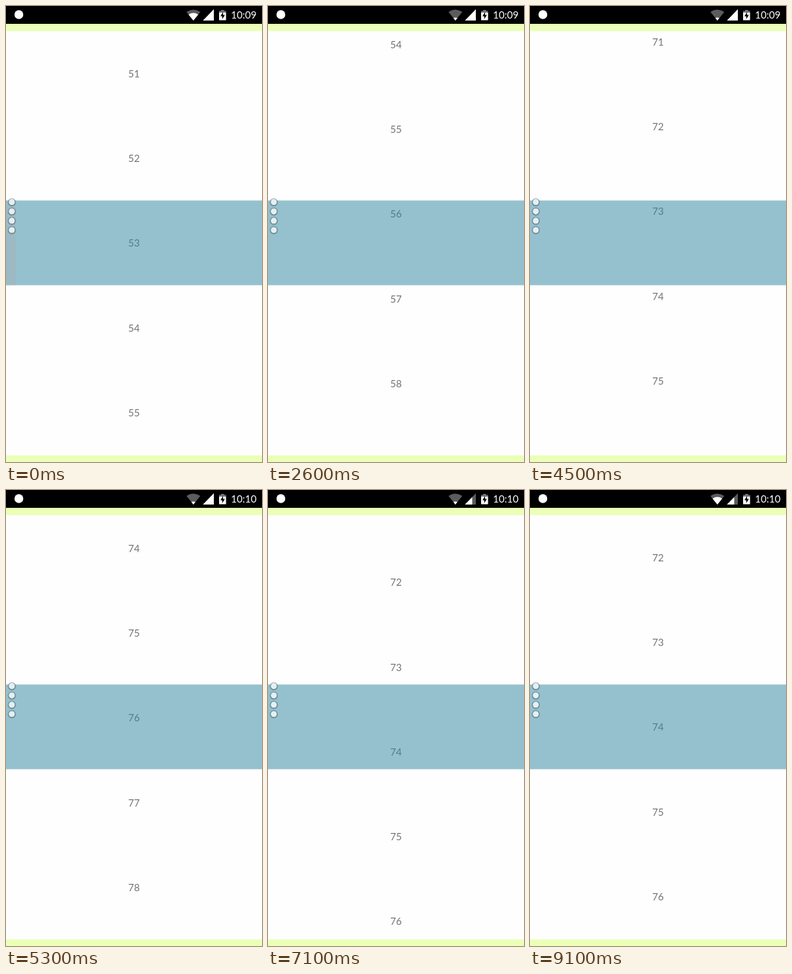
Recreate the animation shown at these times as an HTML page. Size 388x690 px, loop 9300 ms.

```html
<!DOCTYPE html>
<html lang="en">
<head>
<meta charset="utf-8">
<title>Number list</title>
<style>
  html, body { margin: 0; width: 100%; height: 100%; overflow: hidden; background: #fefefe; }
  svg { display: block; width: 100vw; height: 100vh; }
  text { font: 15.1px Lato, "Open Sans", sans-serif; }
</style>
</head>
<body>
<svg viewBox="0 0 388 690">
  <defs>
    <clipPath id="list"><rect y="38" width="388" height="642"/></clipPath>
    <radialGradient id="halo">
      <stop offset=".68" stop-color="#48636c" stop-opacity=".75"/>
      <stop offset="1" stop-color="#48636c" stop-opacity="0"/>
    </radialGradient>
    <path id="fan" d="M0 0L-10.5 -13Q0 -20 10.5 -13Z"/>
  </defs>
  <rect width="388" height="690" fill="#ebffb7"/>
  <rect y="38" width="388" height="642" fill="#fefefe"/>
  <g id="rows" clip-path="url(#list)" text-anchor="middle" fill="#747474"></g>
  <rect id="band" y="294.3" width="388" height="128.2" fill="#2f869f" fill-opacity=".5"/>
  <rect id="edge" y="294.3" width="15" height="128.2" fill="#a9aeb4" fill-opacity=".4"/>
  <g id="dots"></g>

  <rect width="388" height="27" fill="#000"/>
  <circle cx="19.5" cy="13" r="6.7" fill="#fff"/>
  <g transform="translate(284 22)">
    <use href="#fan" fill="#5c5c5c"/>
    <use id="wifi" href="#fan" fill="#fff"/>
  </g>
  <path d="M298.5 22L315 5V22Z" fill="#5c5c5c"/>
  <path id="signal" fill="#fff"/>
  <path d="M323 10V7.5H326V6H330.5V7.5H333.5V10Z" fill="#777"/>
  <path d="M323 10H333.5V21.5H323Z" fill="#fff"/>
  <path d="M329 9L325 15.5H327.7V20L331.8 13.5H329Z" fill="#000"/>
  <text id="clock" x="341" y="19.3" fill="#fff"></text>
</svg>
<script>
const LOOP = 9300, STEP = 100, PITCH = 128.3, BASELINE = 364.4, CENTER = 194;
const byId = id => document.getElementById(id);

function add(parent, tag, attrs) {
  const node = document.createElementNS("http://www.w3.org/2000/svg", tag);
  for (const name in attrs) node.setAttribute(name, attrs[name]);
  return parent.appendChild(node);
}

// [time in ms, number at the centre of the list]
const KEYS = [[0, 53], [1100, 53], [1700, 55.556], [2150, 56], [2400, 56],
  [3400, 61.556], [4500, 73.374], [5300, 76.11], [6150, 77], [6280, 77],
  [7100, 73.708], [7300, 73.52], [8130, 74], [LOOP, 74]];

const slopes = KEYS.slice(1).map(([t, p], i) => (p - KEYS[i][1]) / (t - KEYS[i][0]));

// Monotone tangents: harmonic mean, zero at rests and turning points.
const tangents = KEYS.map((_, i) => {
  const a = slopes[i - 1] || 0, b = slopes[i] || 0;
  return a * b > 0 ? 2 * a * b / (a + b) : 0;
});

function scrollAt(time) {
  const i = Math.max(0, KEYS.findIndex(key => key[0] > time) - 1);
  const [t0, p0] = KEYS[i], [t1, p1] = KEYS[i + 1];
  const span = t1 - t0, u = (time - t0) / span, v = 1 - u;
  return p0 * (1 + 2 * u) * v * v + p1 * u * u * (3 - 2 * u)
    + span * u * v * (tangents[i] * v - tangents[i + 1] * u);
}

const labels = Array.from({ length: 7 }, () => add(byId("rows"), "text", { x: CENTER }));

for (let i = 0; i < 4; i++) {
  const cy = 296.7 + i * 14.1;
  add(byId("dots"), "circle", { cx: 8.8, cy: cy + 0.3, r: 6.8, fill: "url(#halo)" });
  add(byId("dots"), "circle", { cx: 8.8, cy, r: 4.6, fill: "#e5eff2" });
}

function render(time) {
  const position = scrollAt(time), first = Math.round(position) - 3;
  labels.forEach((label, i) => {
    label.textContent = first + i;
    label.setAttribute("y", BASELINE + (first + i - position) * PITCH);
  });
  const wifiStrong = time < 1200 || time >= 7900;
  byId("wifi").setAttribute("transform", `scale(${wifiStrong ? 0.7 : 0.28})`);
  byId("signal").setAttribute("d", time < 6800
    ? "M298.5 22L315 5V22Z" : "M298.5 22L309.5 10.7V22Z");
  byId("edge").setAttribute("visibility", time < 1200 ? "visible" : "hidden");
  byId("clock").textContent = time < 5000 ? "10:09" : "10:10";
}

const start = performance.now();
function tick() {
  const time = (performance.now() - start) % LOOP;
  render(Math.floor(time / STEP) * STEP);
  requestAnimationFrame(tick);
}
render(0);
requestAnimationFrame(tick);
</script>
</body>
</html>
```
